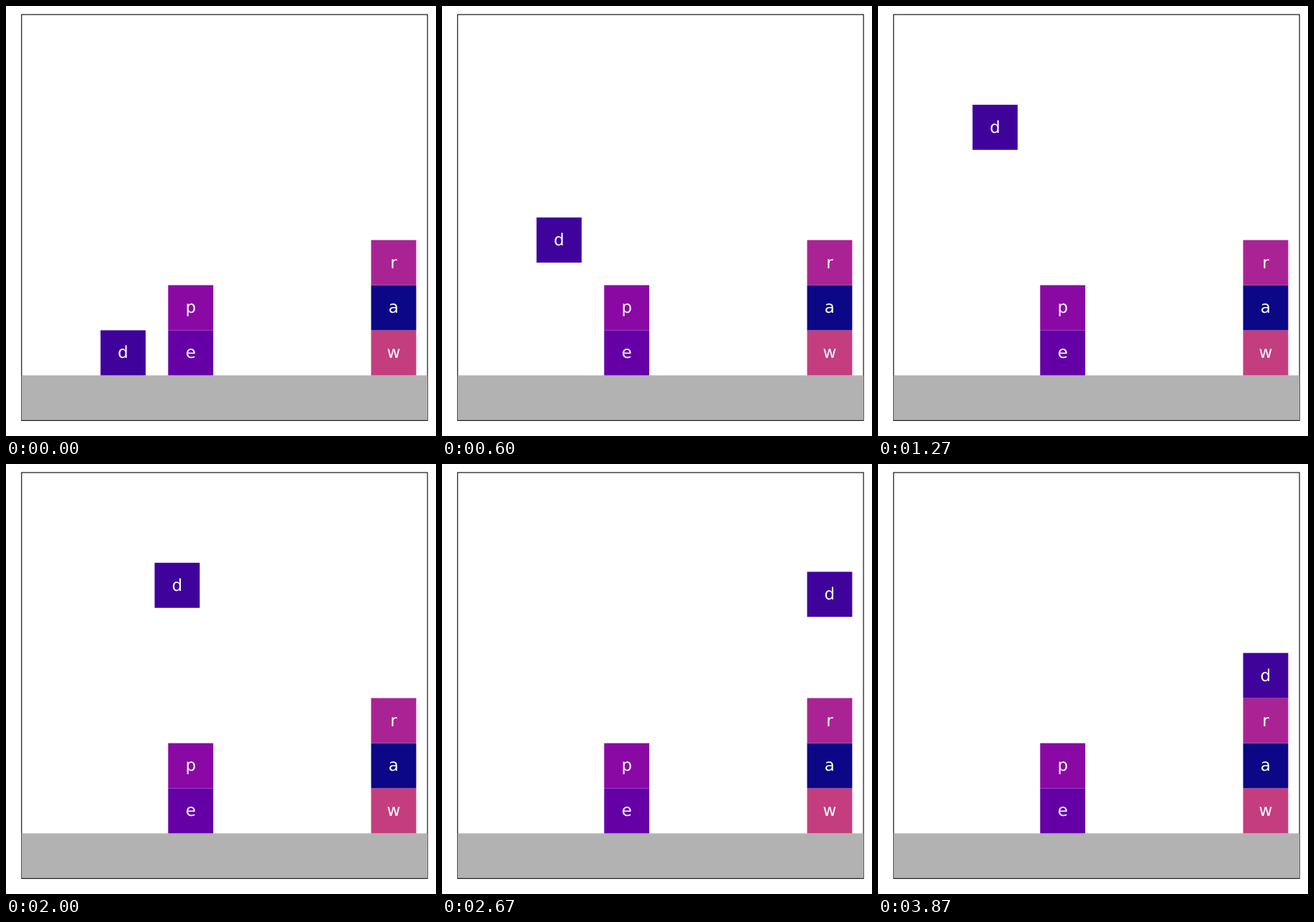
Animation, 600 px wide and 600 px high, one loop 4.87 s. Source, as an HTML page:

```html
<!DOCTYPE html>
<html lang="en">
<head>
<meta charset="utf-8">
<title>Stacking blocks</title>
<style>
html, body { margin: 0; width: 100%; height: 100%; overflow: hidden; background: #fff; }
svg { display: block; width: 100vw; height: 100vh; }
text { font: 23px "DejaVu Sans", sans-serif; fill: #fff; text-anchor: middle; text-rendering: geometricPrecision; }
</style>
</head>
<body>
<svg id="stage" viewBox="0 0 600 600"></svg>
<script>
const LOOP = 4870, STEP = 200 / 3;
const UNIT = 62.93, LEFT = 21.75, TOP = 11.95, SIZE = 9 * UNIT;
const FLOOR = TOP + 8 * UNIT;
const stage = document.getElementById("stage");

function add(parent, tag, attrs) {
  const el = document.createElementNS("http://www.w3.org/2000/svg", tag);
  for (const key in attrs) el.setAttribute(key, attrs[key]);
  return parent.appendChild(el);
}

// Column and row are in block units, counted from the left edge and the floor.
function place(el, col, row) {
  const x = LEFT + col * UNIT, y = FLOOR - (row + 1) * UNIT;
  el.setAttribute("transform", `translate(${x.toFixed(2)} ${y.toFixed(2)})`);
}

function block(label, fill, col, row) {
  const g = add(stage, "g", {});
  add(g, "rect", { width: UNIT, height: UNIT, fill });
  add(g, "text", { x: UNIT / 2, y: UNIT / 2 + 7.5 }).textContent = label;
  place(g, col, row);
  return g;
}

add(stage, "rect", { x: LEFT, y: TOP, width: SIZE, height: SIZE, fill: "#fff", stroke: "#000", "stroke-width": 1.1 });
add(stage, "rect", { x: LEFT, y: FLOOR, width: SIZE, height: UNIT, fill: "#b2b2b2" });
add(stage, "path", { d: `M${LEFT} ${TOP + SIZE}h${SIZE}`, stroke: "#000", "stroke-width": 0.8 });

block("e", "#6500a7", 3.25, 0);
block("p", "#8a09a5", 3.25, 1);
block("w", "#c43e7f", 7.75, 0);
block("a", "#0c0786", 7.75, 1);
block("r", "#aa2395", 7.75, 2);
const mover = block("d", "#3f039c", 1.75, 0);

// Lift five rows, wait, carry six columns, then lower two rows.
// The lift and the carry each open with a double step.
function pose(n) {
  const lift = n < 1 ? 0 : Math.min(5, (n + 1) * 0.25);
  const carry = n < 30 ? 0 : Math.min(6, (n - 28) * 0.6);
  const drop = Math.min(2, Math.max(0, (n - 38) * 0.1));
  return [1.75 + carry, lift - drop];
}

function draw(ms) {
  const t = Math.floor((ms % LOOP) / 10) * 10;
  place(mover, ...pose(Math.floor((t + 5) / STEP)));
}

let start;
function tick(now) {
  start ??= now;
  draw(now - start);
  requestAnimationFrame(tick);
}
draw(0);
requestAnimationFrame(tick);
</script>
</body>
</html>
```
